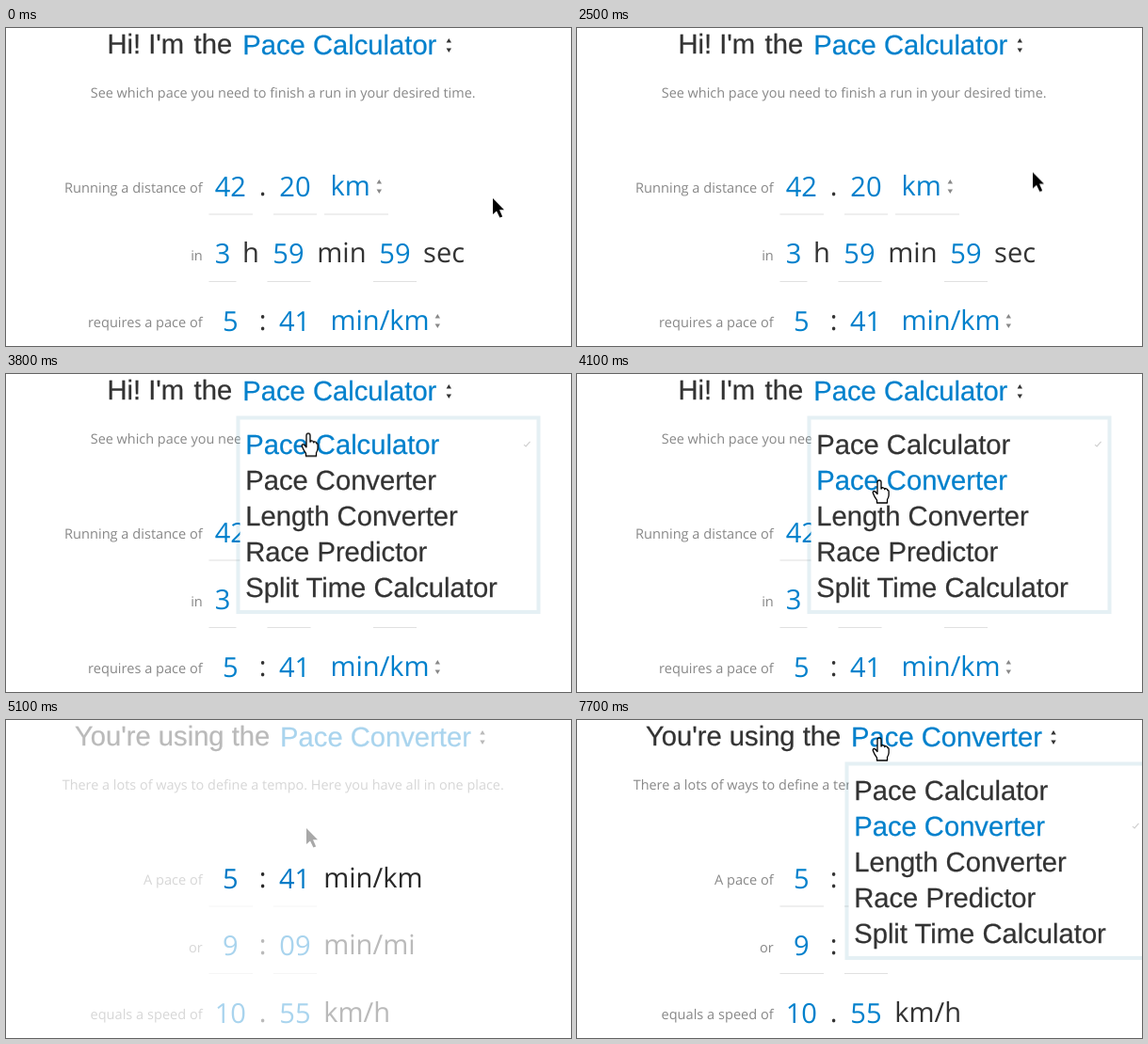
Recreate the animation shown at these times as an HTML page. Size 600 by 338 pixels, loop 8 s.

```html
<!DOCTYPE html>
<html lang="en">
<head>
<meta charset="utf-8">
<title>Pace tools</title>
<style>
  html, body { margin: 0; width: 100%; height: 100%; overflow: hidden; background: #fff; }
  svg { display: block; width: 100vw; height: 100vh; --blue: #0080cc; --ink: #333; }
  text { font: 29.1px "Open Sans", sans-serif; fill: var(--ink); text-rendering: geometricPrecision; white-space: pre; }
  .title text, .list text { font: 29.2px "Liberation Sans", Arial, sans-serif; stroke: var(--ink); stroke-width: .25; }
  .title .end, .label { text-anchor: end; }
  text.blue { fill: var(--blue); }
  .title text.blue { stroke: var(--blue); }
  .mid { text-anchor: middle; }
  text.label { font-size: 14.6px; fill: #888; }
  text.sub { font-size: 14.45px; fill: #888; text-anchor: middle; }
  .rule { stroke: #e0e0e0; stroke-width: 1.2; fill: none; }
  .small { fill: #888; }
  .list .i0 { fill: var(--c0, var(--ink)); stroke: var(--c0, var(--ink)); }
  .list .i1 { fill: var(--c1, var(--ink)); stroke: var(--c1, var(--ink)); }

  /* every change is a hard cut on an 8 s clock */
  .calc, .conv, .menu, .dim, .lit, .arrow, .hand { animation: 8s step-end infinite; }
  .calc { animation-name: first; }
  .conv { animation-name: second; }
  .menu.a { animation-name: menuA; }
  .menu.b { animation-name: menuB; --c1: var(--blue); }
  .dim { animation-name: dim; }
  .lit { animation-name: lit; }
  .hand { animation-name: hand; }
  .arrow { animation-name: arrow; }
  .pointer { animation: move 8s linear infinite; }

  @keyframes first { 0% { visibility: visible } 57.5%, 100% { visibility: hidden } }
  @keyframes second { 0% { visibility: hidden } 57.5%, 100% { visibility: visible } }
  @keyframes menuA {
    0% { visibility: hidden; --c0: #0080cc; --c1: #333 }
    38.75% { visibility: visible; --c0: #0080cc; --c1: #333 }
    50% { visibility: visible; --c0: #333; --c1: #0080cc }
    57.5%, 100% { visibility: hidden; --c0: #333; --c1: #0080cc }
  }
  @keyframes menuB { 0% { visibility: hidden } 96.25%, 100% { visibility: visible } }
  @keyframes dim {
    0%, 31.25%, 88.75%, 100% { opacity: 1 }
    6.25%, 63.75% { opacity: .34 }
  }
  @keyframes lit {
    0%, 31.25%, 88.75%, 100% { --blue: #0080cc; --ink: #333 }
    6.25%, 63.75% { --blue: #0079c6; --ink: #292929 }
  }
  @keyframes hand {
    0%, 57.5% { visibility: hidden }
    37.5%, 95%, 100% { visibility: visible }
  }
  @keyframes arrow {
    0%, 57.5% { visibility: visible }
    37.5%, 95%, 100% { visibility: hidden }
  }
  @keyframes move {
    0% { transform: translate(517px, 181px) }
    31.25% { transform: translate(517px, 181px); animation-timing-function: steps(6, start) }
    38.75% { transform: translate(319px, 15.5px) }
    45% { transform: translate(319px, 15.5px); animation-timing-function: steps(6, start) }
    52.5% { transform: translate(319px, 115px) }
    88.75% { transform: translate(319px, 115px); animation-timing-function: steps(6, start) }
    96.25%, 100% { transform: translate(319px, 21px) }
  }
</style>
</head>
<body>
<svg viewBox="0 0 600 338" preserveAspectRatio="none">
  <defs>
    <path id="updown" d="M-2.7 -3L0 -7.4L2.7 -3ZM-2.7 3L0 7.4L2.7 3Z"/>
    <path id="check" d="M-3.3 .6L-1.2 2.5L3.2 -2.6" fill="none" stroke="#d0d0d0" stroke-width="1.2"/>
    <g id="list" class="list">
      <rect x="248.5" y="48.5" width="315" height="202.5" fill="#fff"/>
      <rect x="246.5" y="46.5" width="319" height="206.5" fill="none" stroke="#006e96" stroke-opacity=".1" stroke-width="4"/>
      <text class="i0" x="254.2" y="84.8">Pace Calculator</text>
      <text class="i1" x="254.2" y="122.8">Pace Converter</text>
      <text x="254.2" y="160.8">Length Converter</text>
      <text x="254.2" y="198.8">Race Predictor</text>
      <text x="254.2" y="236.8">Split Time Calculator</text>
    </g>
  </defs>

  <g class="calc">
    <g class="dim">
      <g class="title">
        <text x="107.4" y="27.2">Hi! I'm</text>
        <text class="end" x="240.2" y="27.2">the</text>
        <text class="blue" x="251.3" y="27.6">Pace Calculator</text>
        <use href="#updown" x="470.3" y="18.5" fill="#333"/>
      </g>
      <text class="sub" x="294.2" y="74.3">See which pace you need to finish a run in your desired time.</text>

      <text class="label" x="208.8" y="175">Running a distance of</text>
      <text class="blue mid" x="238.3" y="178.6">42</text>
      <text class="mid" x="272.6" y="177.6">.</text>
      <text class="blue mid" x="307" y="178.6">20</text>
      <text class="blue" x="344.4" y="178.2">km</text>
      <use href="#updown" class="small" x="396.3" y="168.5"/>

      <text class="label" x="208.8" y="246.5">in</text>
      <text class="blue mid" x="230" y="250.2">3</text>
      <text x="251" y="249.2">h</text>
      <text class="blue mid" x="300" y="250.2">59</text>
      <text x="330.3" y="249.2">min</text>
      <text class="blue mid" x="413" y="250.2">59</text>
      <text x="443" y="249.2">sec</text>
      <path class="rule" d="M215.5 198H262M284 198H330M338 198H406M215.5 269.5H244.5M277.5 269.5H323.5M390 269.5H436"/>

      <text class="label" x="208.8" y="318">requires a pace of</text>
    </g>
    <g class="lit">
      <text class="blue mid" x="238.3" y="321.8">5</text>
      <text class="mid" x="272.6" y="320.8">:</text>
      <text class="blue mid" x="306.6" y="321.8">41</text>
      <text class="blue" x="344.4" y="321.4">min/km</text>
      <use href="#updown" class="small" x="458.3" y="311.5"/>
    </g>
  </g>

  <g class="conv">
    <g class="dim">
      <g class="title">
        <text class="end" x="280.3" y="27.2">You're using the</text>
        <text class="blue" x="291.1" y="27.6">Pace Converter</text>
        <use href="#updown" x="506" y="18.5" fill="#333"/>
      </g>
      <text class="sub" x="294.2" y="74.3">There a lots of ways to define a tempo. Here you have all in one place.</text>

      <text class="label" x="208.8" y="175">A pace of</text>
      <text class="label" x="208.8" y="246.5">or</text>
      <text class="blue mid" x="238.3" y="250.2">9</text>
      <text class="mid" x="272.6" y="249.2">:</text>
      <text class="blue mid" x="307" y="250.2">09</text>
      <text x="337.2" y="249.2">min/mi</text>
      <path class="rule" d="M215.5 198H262M284 198H330M215.5 269.5H262M284 269.5H330"/>

      <text class="label" x="208.8" y="318">equals a speed of</text>
      <text class="blue mid" x="238.3" y="321.8">10</text>
      <text class="mid" x="272.6" y="320.8">.</text>
      <text class="blue mid" x="307" y="321.8">55</text>
      <text x="337.2" y="320.8">km/h</text>
    </g>
    <g class="lit">
      <text class="blue mid" x="238.3" y="178.6">5</text>
      <text class="mid" x="272.6" y="177.6">:</text>
      <text class="blue mid" x="306.6" y="178.6">41</text>
      <text x="337.2" y="177.6">min/km</text>
    </g>
  </g>

  <g class="menu a">
    <use href="#list"/>
    <use href="#check" x="553.3" y="74.5"/>
  </g>
  <g class="menu b">
    <use href="#list" x="40"/>
    <use href="#check" x="593.3" y="112.5"/>
  </g>

  <g class="pointer">
    <g class="dim">
      <path class="arrow" d="M0 0V17L4 13.4L7.4 20.6L10.2 19.4L7 12.3H12Z" fill="#000" stroke="#fff" stroke-width="1.6" paint-order="stroke"/>
      <path class="hand" transform="translate(2 -2)" fill="#fff" stroke="#000" stroke-width="1.3" stroke-linejoin="round"
        d="M-2 2Q-2 0 0 0Q2 0 2 2V9Q2.3 7.6 4 7.8Q5.6 8 5.7 9.6Q6 8.6 7.3 8.8Q8.7 9 8.8 10.6Q10 10.2 10.1 12V16Q10 18 8.5 20.5V24H-2.5V21.2Q-5 18 -6.5 14Q-7.2 12.2 -6 11.6Q-4.6 11 -2 14.5Z"/>
    </g>
  </g>
</svg>
</body>
</html>
```
